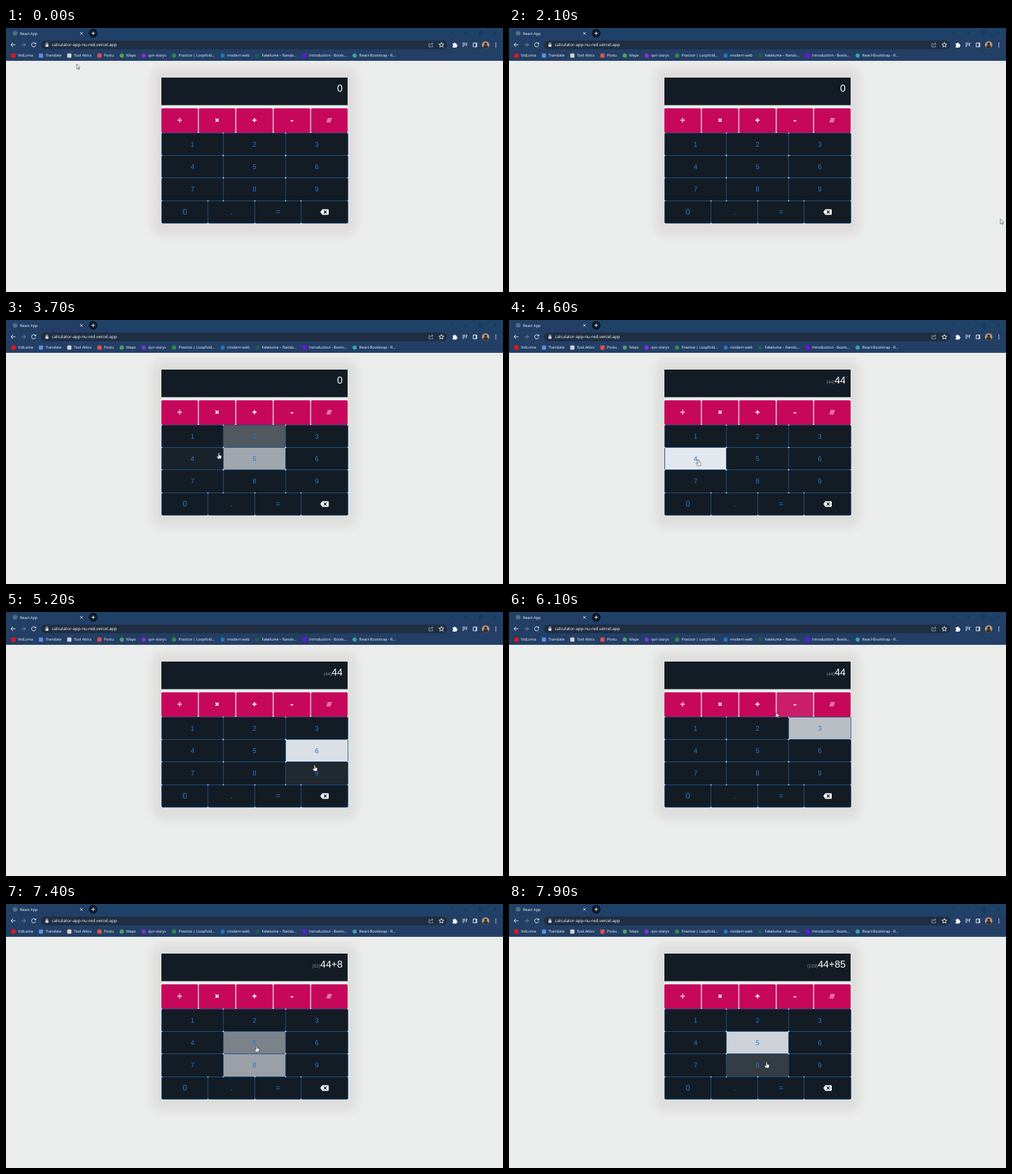
Write an HTML page that moves like this. It is 710 px wide and 378 px high and loops after 8000 ms.

```html
<!DOCTYPE html>
<html lang="en">
<head>
<meta charset="utf-8">
<title>React App</title>
<style>
html, body { margin: 0; width: 100%; height: 100%; overflow: hidden; background: #ebecec; }
svg { display: block; width: 710px; height: 378px; text-rendering: geometricPrecision; }
.ui { font: 500 5.35px "Open Sans", "Noto Sans", sans-serif; fill: #fff; }
.calc { font-family: "Liberation Sans", Arial, sans-serif; text-anchor: middle; }
.line { fill: none; stroke: #f0f3f7; stroke-width: .9; }
.dim { stroke: #122a47; stroke-width: .7; }
.dots { fill: none; stroke: #fff; stroke-width: 1.5; stroke-linecap: round; stroke-dasharray: 0 2.5; }
.op { fill: none; stroke: #fff; stroke-width: 1.6; }
#shadow { filter: blur(6px); }
</style>
</head>
<body>
<svg viewBox="0 0 710 378">
  <g class="ui">
    <rect width="710" height="47" fill="#233f66"/>
    <rect width="710" height="15" fill="#1f4269"/>
    <rect x="4" y="1" width="110" height="15" rx="3" fill="#233f66"/>
    <circle cx="13" cy="7.6" r="3.4" fill="#4d7186"/>
    <text x="20" y="9.6">React App</text>
    <path class="line" d="M106 6l3.500 3.500m0-3.500l-3.500 3.500"/>
    <circle cx="124.600" cy="7.600" r="6.300" fill="#0e1826"/>
    <path class="line" d="M122 7.600h5.200M124.600 5v5.200"/>
    <path class="line dim" d="M634 6l2 2 2-2M654 7.600h5M676 5h4v4h-4zM697 5l4 4m0-4l-4 4"/>
    <rect x="50" y="18" width="580" height="12.500" rx="6.200" fill="#1f2e42"/>
    <path class="line" d="M13.500 24H7.500M10 21l-3 3 3 3M42 22.300a3 3 0 1 0 .4 2.600M42.700 20.800v2h-2"/>
    <path class="line" opacity=".4" d="M22 24h6M25 21l3 3-3 3"/>
    <path class="line" d="M57.200 23.500v-1a1.300 1.300 0 0 1 2.600 0v1"/>
    <rect x="56.500" y="23.400" width="4" height="3.400" rx=".5"/>
    <text x="65.500" y="26.300" font-size="6.150">calculator-app-nu-red.vercel.app</text>
    <path class="line dim" style="stroke:#aab4c2" d="M606 22.500h-2V27h5.500v-2M605.500 25q.5-2.700 4-2.700M608 20.700l2 1.700-2 1.700"/>
    <path class="line" d="M622 20.700l1 2.300 2.500.2-1.900 1.600.6 2.500-2.200-1.300-2.200 1.300.6-2.500-1.900-1.600 2.500-.2z"/>
    <path d="M638 22.300h1.700a1.200 1.200 0 0 1 2.400 0h1.600v1.800a1.200 1.200 0 0 1 0 2.400V28H638v-1.700a1.300 1.300 0 0 0 0-2.500z"/>
    <path class="line" d="M652 21.800h4.500M652 24h4.500M652 26.200h2.500M657.700 26v-4.200h1.500"/>
    <path class="line" d="M667.400 21.500h5.200v5.400h-5.200zM671.500 21.500v5.400"/>
    <circle cx="685.200" cy="24.200" r="5.300" fill="#b99b7d"/>
    <path d="M681.500 28a3.700 3.700 0 0 1 7.400 0a5.300 5.300 0 0 1-7.400 0" fill="#38302f"/>
    <circle cx="685.200" cy="22.800" r="2" fill="#38302f"/>
    <path class="dots" d="M699.800 21.700v5.100"/>
    <g id="bookmarks"></g>
  </g>
  <g class="calc">
    <rect id="shadow" x="209" y="57" width="292" height="240" rx="14" fill-opacity=".07"/>
    <rect x="222" y="71" width="266" height="100" fill="#ebecec"/>
    <rect x="222" y="71" width="266" height="39.500" fill="#131c25"/>
    <rect x="222" y="150" width="266" height="129.500" rx="1.500" fill="#131c24"/>
    <text x="481" y="91" style="text-anchor:end" fill="#fff" font-size="14.200"><tspan id="result" font-size="6.500" fill="#8b9096"></tspan><tspan id="entry"></tspan></text>
    <g id="keys"></g>
    <g id="corners" fill="#d5dbe2"></g>
  </g>
  <path id="cursor" stroke="#111" stroke-width=".5" fill="#fff"/>
</svg>
<script>
const $ = id => document.getElementById(id);
const LOOP = 8000, STEP = 100, HOVER_FROM = 2700, FADE_IN = 200, FADE_OUT = 250;

function add(parent, tag, attrs, text = "") {
  const node = document.createElementNS("http://www.w3.org/2000/svg", tag);
  for (const name in attrs) node.setAttribute(name, attrs[name]);
  node.textContent = text;
  return parent.appendChild(node);
}

// Bookmarks flow from left to right with a fixed gap
let left = 7.5;
for (const [label, fill, rx] of [
  ["VidLoma", "#e3151a", 1], ["Translate", "#5c8fe6", 1], ["Tool Attics", "#d9d3cd", 1], ["Postu", "#df5348", 1],
  ["Maps", "#4ea25e", 3], ["qvn olarys", "#8b2be0", 3], ["Practice | Loopfold...", "#2f8d46", 3],
  ["modern web", "#1e78bd", 3], ["Fakelume – Rando...", "#1f5d42", 3],
  ["Introduction - Boots...", "#6c12e6", 1], ["React-Bootstrap - R...", "#3aa3a0", 3]
]) {
  add($("bookmarks"), "rect", { x: left, y: 36.5, width: 6, height: 6, rx, fill });
  const text = add($("bookmarks"), "text", { x: left + 9.5, y: 41.1 }, label);
  left += 9.5 + text.getComputedTextLength() + 8.2;
}

const DARK = [19, 28, 36], PINK = [199, 7, 92], LIGHT = [227, 232, 238];
const keys = [];

function addKey(x, y, width, height, base) {
  const rect = add($("keys"), "rect", { x, y, width, height, rx: base === PINK ? 1.5 : 0 });
  keys.push({ x, y, width, height, base, rect });
  return [x + width / 2, y + height / 2];
}

// Key of the number pad: cell edges sit on pixel centres, with a hairline and light corners
function addCell(column, row, columns) {
  const snap = v => Math.floor(v) + .5;
  const x = snap(222 + column * 266 / columns), right = snap(222 + (column + 1) * 266 / columns);
  const y = snap(150 + row * 32.4), bottom = snap(150 + (row + 1) * 32.4);
  const center = addKey(x, y, right - x, bottom - y, DARK);
  const { rect } = keys[keys.length - 1];
  rect.setAttribute("stroke", "#1b5490");
  rect.setAttribute("stroke-width", .8);
  for (const cx of [x, right]) for (const cy of [y, bottom]) add($("corners"), "circle", { cx, cy, r: .8 });
  return center;
}

function addLabel([x, y], text, size) {
  add($("keys"), "text", { x, y: y + size * .34, "font-size": size, fill: "#2878d6" }, text);
}

const PLUS = "M-3 0h6M0-3v6";
[
  ["M-3 0h6M0-3.300v1.600M0 1.700v1.600"], [PLUS, "rotate(45)"], [PLUS], ["M-1.800 .8h3.600"],
  ["M-2.500-2.200h6M-3.300 0h6M-4.100 2.200h6", "", 1]
].forEach(([d, turn = "", width = 1.6], i) => {
  const [x, y] = addKey(222 + i * 53.45, 115, 52.2, 35, PINK);
  add($("keys"), "path", { d, class: "op", transform: `translate(${x} ${y - .5}) ${turn}`, style: `stroke-width:${width}` });
});

for (let i = 0; i < 9; i++) addLabel(addCell(i % 3, Math.floor(i / 3), 3), i + 1, 9.8);
[..."0.="].forEach((text, i) => addLabel(addCell(i, 3, 4), text, 11.5));
const eraser = add($("keys"), "g", { transform: `translate(${addCell(3, 3, 4)})` });
add(eraser, "path", { d: "M-6 0L-3-4H5Q6-4 6-3V3Q6 4 5 4H-3Z", fill: "#fff" });
add(eraser, "path", { d: "M-1-2l4 4m0-4l-4 4", stroke: "#131c24", "stroke-width": 1.2 });

// Cursor way points: time, x, y
const path = [
  [0, 101, 51.5], [400, 101, 51.5], [1200, 244, 109], [1400, 264, 195], [2000, 264, 198],
  [2100, 702, 273.5], [2700, 702, 273.5], [3250, 400, 160], [3520, 346, 182], [3700, 304, 190],
  [3900, 272, 198], [4700, 270, 200], [5000, 438, 196], [5200, 441, 219], [5600, 444, 225],
  [5950, 426, 164], [6100, 381.8, 144], [6200, 356, 134], [6500, 354, 138], [6600, 352, 182],
  [6800, 349.5, 219], [7200, 352, 225], [7400, 358, 203], [7800, 362, 205], [7900, 368, 226]
];

function cursorAt(t) {
  const i = path.findIndex(p => p[0] > t);
  if (i < 0) return path[path.length - 1].slice(1);
  const [t0, x0, y0] = path[i - 1], [t1, x1, y1] = path[i];
  const k = (t - t0) / (t1 - t0);
  return [x0 + (x1 - x0) * k, y0 + (y1 - y0) * k];
}

const inside = (key, [x, y]) =>
  x >= key.x && x < key.x + key.width && y >= key.y && y < key.y + key.height;

// Hover fade, rebuilt from where the cursor was during the last moments
function hoverAmount(key, t) {
  let level = 0;
  for (let s = Math.max(HOVER_FROM, t - 800); s < t; s += 10) {
    level += inside(key, cursorAt(s)) ? 10 / FADE_IN : -10 / FADE_OUT;
    level = Math.min(1, Math.max(0, level));
  }
  return level * level * (3 - 2 * level);
}

const presses = [[4100, "4"], [4600, "4"], [6400, "+"], [7100, "8"], [7600, "5"]];

const ARROW = "M0 0V7.200L1.700 5.700 2.800 8 3.800 7.500 2.800 5.300H5Z";
const HAND = "M-.8.500Q0-.5.8.500V3.500L3.200 4Q4 4.300 3.900 5.300L3.300 8.800H-1.200L-3 5.700Q-3.200 4.800-2.300 4.900L-.8 6Z";

function draw(t) {
  const spot = cursorAt(t);
  const overKey = t >= HOVER_FROM && keys.some(key => inside(key, spot));
  $("cursor").setAttribute("d", overKey ? HAND : ARROW);
  $("cursor").setAttribute("transform", `translate(${spot})`);
  for (const key of keys) {
    const k = hoverAmount(key, t);
    key.rect.setAttribute("fill", `rgb(${key.base.map((c, i) => Math.round(c + (LIGHT[i] - c) * k))})`);
  }
  const entry = presses.filter(([time]) => time <= t).map(([, key]) => key).join("");
  const sum = entry.split("+").reduce((total, part) => total + Number(part), 0);
  $("entry").textContent = entry || "0";
  $("result").textContent = entry && `(${sum})`;
  $("shadow").setAttribute("fill", t < HOVER_FROM ? "#5a1020" : "#403010");
}

function tick() {
  draw(Math.floor(performance.now() % LOOP / STEP) * STEP);
  requestAnimationFrame(tick);
}
tick();
</script>
</body>
</html>
```
